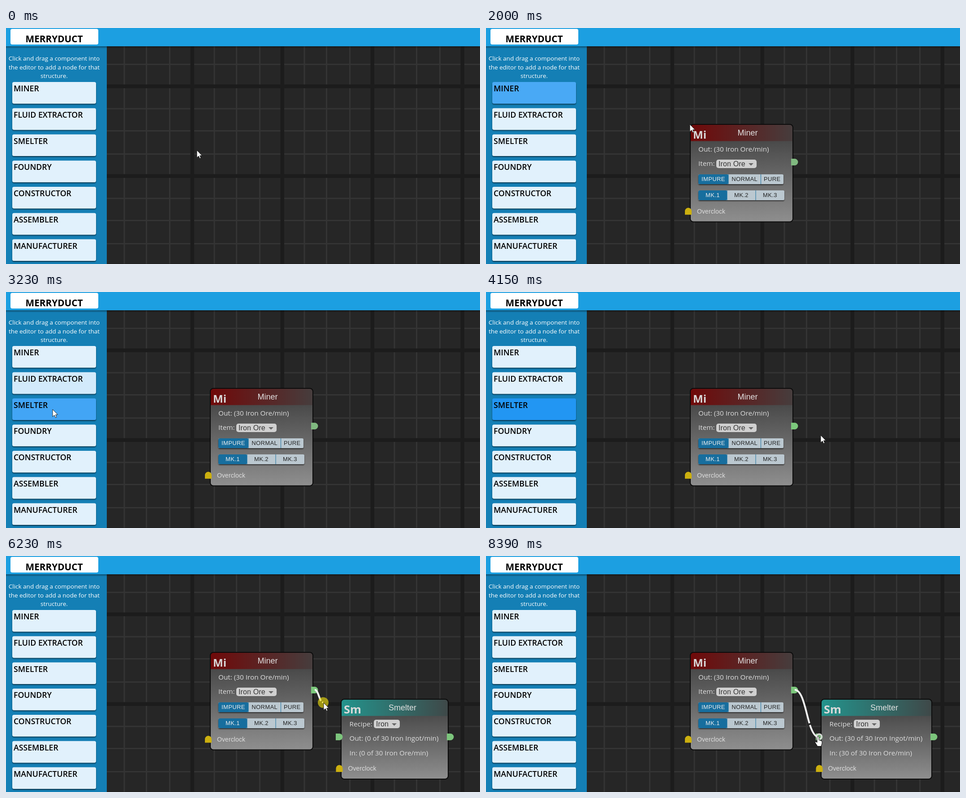
An HTML page that plays this animation: 1058x529 px, repeating every 8.46 s.

```html
<!DOCTYPE html>
<html lang="en">
<head>
<meta charset="utf-8">
<title>Node editor demo</title>
<style>
  html, body { margin: 0; width: 100%; height: 100%; overflow: hidden; background: #262626; }
  svg { display: block; width: 1058px; height: 529px; }
  text { font-family: "Open Sans", "Noto Sans", sans-serif; }
  .hint { font-size: 13.5px; fill: #fff; text-anchor: middle; }
  .card { font-size: 17.7px; font-weight: 600; }
  .heavy { font: 900 33.5px "Noto Sans", sans-serif; font-stretch: extra-condensed; }
  .label { font-size: 15.3px; fill: #dedede; }
  .title, .select, .small, .button { font-family: "Liberation Sans", Arial, sans-serif; }
  .title { font-size: 18px; fill: #e2e2e2; text-anchor: middle; }
  .select { font-size: 16px; letter-spacing: .15px; fill: #333; }
  .small { font-size: 14px; letter-spacing: .1px; fill: #dedede; }
  .button { font-size: 13px; letter-spacing: .37px; text-anchor: middle; }
</style>
</head>
<body>
<svg id="stage" viewBox="0 0 1058 529">
  <defs>
    <linearGradient id="body" x2="0" y2="1">
      <stop offset=".17" stop-color="#4b4b4b"/><stop offset="1" stop-color="#939393"/>
    </linearGradient>
    <linearGradient id="red"><stop stop-color="#700909"/><stop offset="1" stop-color="#463d3d"/></linearGradient>
    <linearGradient id="teal"><stop stop-color="#23948d"/><stop offset="1" stop-color="#3f4848"/></linearGradient>
    <linearGradient id="shade" x2="0" y2="1">
      <stop stop-opacity=".4"/><stop offset="1" stop-opacity="0"/>
    </linearGradient>
    <filter id="drop" x="-10%" y="-20%" width="120%" height="150%">
      <feDropShadow dx="0" dy="2" stdDeviation="1.2" flood-opacity=".6"/>
    </filter>
  </defs>
</svg>
<script>
const stage = document.getElementById('stage');
const FPS = 13, LOOP = 8460;
const cardNames = ['MINER', 'FLUID EXTRACTOR', 'SMELTER', 'FOUNDRY', 'CONSTRUCTOR', 'ASSEMBLER', 'MANUFACTURER'];
const cardY = i => 121 + 58.75 * i;

const rect = (x, y, w, h, fill, more = '') =>
  `<rect x="${x}" y="${y}" width="${w}" height="${h}" fill="${fill}" ${more}/>`;
const text = (cls, x, y, str, more = '') => `<text class="${cls}" x="${x}" y="${y}" ${more}>${str}</text>`;

function grid() {
  let minor = '', major = '';
  for (let k = 0; k < 5; k++) {
    const x = 214.5 + 201 * k, y = -70 + 201 * k;
    for (const d of [49.5, 99, 151]) {
      minor += rect(x + d - 1.5, 41, 3, 488, '#343434') + rect(225, y + d - 1, 833, 3, '#343434');
    }
    major += rect(x - 4, 41, 8.5, 488, '#1c1c1c') + rect(225, y - 4.5, 833, 8.5, '#1c1c1c');
  }
  return rect(225, 41, 833, 488, '#262626') + minor + major;
}

function sidebar() {
  const hints = ['Click and drag a component into', 'the editor to add a node for that', 'structure.'];
  return rect(0, 41, 225, 488, '#147fb5') + rect(0, 41, 1058, 5, 'url(#shade)') +
    rect(0, 0, 1058, 41, '#1c9fe1') + rect(10, 2, 196, 35, '#fff', 'rx="4"') +
    text('heavy', 107.5, 32, 'MERRYDUCT', 'text-anchor="middle" data-max="128"') +
    hints.map((h, i) => text('hint', 107.5, 73 + 19.5 * i, h)).join('') +
    cardNames.map((n, i) => rect(14, cardY(i), 187, 48.5, '#e1f1fc', `rx="4" id="card${i}" filter="url(#drop)"`) +
      text('card', 17, cardY(i) + 21, n)).join('');
}

const socket = (x, y, cls = '') =>
  `<path class="${cls}" d="M${x} ${y}h8a7.5 7.5 0 0 1 0 15h-8z" fill="#7cc57c"/>`;
const clockSocket = (x, y) =>
  `<path d="M${x} ${y + 15}v-8a7.5 7.5 0 0 1 15 0v8z" fill="#ccb00f"/>` + text('small', x + 27, y + 12, 'Overclock');
const select = (x, y, w, str) => rect(x, y, w, 19, '#d0d0d0', 'rx="5"') + text('select', x + 5, y + 15, str) +
  `<path d="M${x + w - 18} ${y + 8}h11l-5.5 5.5z" fill="#666"/>`;

function buttons(x, y, names, widths) {
  const total = widths.reduce((a, b) => a + b);
  let out = rect(x, y, total, 22, '#bbc8d0', 'rx="3" filter="url(#drop)"');
  names.forEach((name, i) => {
    const w = widths[i];
    if (i === 0) out += rect(x, y, w, 22, '#176e9e', 'rx="3"');
    else out += rect(x - .5, y, 1, 22, '#176e9e');
    out += text('button', x + w / 2, y + 15, name, `fill="${i ? '#222' : '#eee'}"`);
    x += w;
  });
  return out;
}

function node(x, y, w, h, grad, icon, iconMax, title, titleX, content) {
  return rect(x, y, w, h, 'url(#body)', 'rx="7" opacity=".96"') +
    `<path d="M${x} ${y + 37.5}v-31q0-6.500 6.500-6.500h${w - 13}q6.500 0 6.500 6.500v31z" fill="url(#${grad})"/>` +
    rect(x, y, w, h, 'none', 'rx="7" stroke="#0b0b0b" stroke-width="2"') +
    text('heavy', x + 6, y + 31.500, icon, `fill="#d9d9d9" data-max="${iconMax}"`) +
    text('title', titleX, y + 25, title) + content;
}

const minerNode = () => node(456, 216, 229, 218.5, 'red', 'Mi', 30, 'Miner', 584,
  text('label', 474, 277, 'Out: (30 Iron Ore/min)') + text('label', 474, 309, 'Item:') +
  select(514, 295, 90, 'Iron Ore') +
  buttons(474, 328, ['IMPURE', 'NORMAL', 'PURE'], [67, 72.5, 50.5]) +
  buttons(474, 364, ['MK.1', 'MK.2', 'MK.3'], [64, 64, 64]) +
  socket(681, 293, 'ore') + clockSocket(444, 403.500));

const smelterNode = (rate, w) => node(748, 321, w, 179, 'teal', 'Sm', 39, 'Smelter', 765.5 + w / 2,
  text('label', 766.5, 382, 'Recipe:') + select(821, 367, 58, 'Iron') +
  text('label', 766.5, 414, `Out: (${rate} of 30 Iron Ingot/min)`) +
  text('label', 766.5, 447, `In: (${rate} of 30 Iron Ore/min)`) +
  socket(736, 398) + socket(736 + w + 9, 398) + clockSocket(736.5, 469));

const group = (id, content) => `<g id="${id}">${content}</g>`;
stage.insertAdjacentHTML('beforeend', grid() + sidebar() +
  group('miner', minerNode()) + group('smelter', smelterNode(0, 239)) + group('fedSmelter', smelterNode(30, 247)) +
  group('ring', '<circle cx="743.5" cy="405" r="7.5" fill="#d6d6d6"/><circle cx="743.5" cy="405" r="4" fill="#72b272"/>') +
  '<path id="link" fill="none" stroke="#f3f3f3" stroke-width="4"/>' +
  group('ghost', rect(0, 0, 188, 49, '#2196f3', 'rx="2"') + text('card', 4, 21, '', 'id="ghostName"')) +
  '<circle id="press" r="12" fill="rgba(240,225,15,.62)"/>' +
  group('arrow', '<path d="M0 0V16.500L4 13 6.500 18.500 9 17.400 6.600 12H11.500Z" fill="#fff" stroke="#111" stroke-width=".9"/>') +
  group('hand', '<path d="M-2 1.500a2 2 0 0 1 4 0v6l5 1.500q2 .5 2 3v3l-2 6.500h-8l-5-8q-1-2 1-2.500l3 2z" fill="#fff" stroke="#111"/>') +
  group('dragMark', rect(2, 16, 11, 7, 'none', 'stroke="#ddd" stroke-width="2" stroke-dasharray="1.500 1.500"')));

// Shrink the heavy lettering evenly when the condensed face is missing.
for (const el of document.querySelectorAll('.heavy')) {
  const width = el.getComputedTextLength();
  if (width > el.dataset.max) el.style.fontSize = 33.5 * el.dataset.max / width + 'px';
}

const $ = id => document.getElementById(id);
const show = (id, on) => $(id).setAttribute('visibility', on ? 'visible' : 'hidden');
const move = (id, x, y) => $(id).setAttribute('transform', `translate(${x} ${y})`);

const eases = {
  linear: u => u,
  in: u => u ** 1.5,
  out: u => 1 - (1 - u) ** 1.5,
  both: u => u * u * (3 - 2 * u)
};

// Keys are [step, values..., ease into this key]; steps run at 13 per second.
function sample(keys, step) {
  const i = keys.findIndex(k => k[0] > step);
  if (i === 0) return keys[0].slice(1);
  if (i < 0) return keys[keys.length - 1].slice(1);
  const a = keys[i - 1], b = keys[i];
  const name = b[b.length - 1];
  const u = (eases[name] || eases.linear)((step - a[0]) / (b[0] - a[0]));
  return a.slice(1).map((v, k) => typeof v === 'number' ? v + (b[k + 1] - v) * u : v);
}

const pointerKeys = [
  [0, 426, 274, ''], [12, 161, 143, 'both'],
  [13, 161, 143, ''], [18, 306, 175, 'in'], [23, 455, 216, 'out'],
  [33, 455, 216, ''], [37, 290, 219, 'in'], [40, 150, 238, 'linear'], [42, 104, 263, 'out'], [44, 100, 266, 'out'],
  [54, 747, 321, 'both'],
  [66, 747, 321, ''], [70, 684, 305, 'both'],
  [77, 684, 305, ''], [81, 709, 329, 'in'], [88, 741, 405, 'out']
];
const cardKeys = [
  [[9, 0], [12, .85], [13, 1], [25, 1], [26, .79], [28, 0]],
  [[37, 0], [39, .5], [42, .08], [43, 0]],
  [[40, 0], [42, .83], [44, .85], [45, 1], [54, 1], [55, .8], [57, 0]]
];
const drags = [
  { from: 13, to: 23, card: 0, dx: 147, dy: 22 },
  { from: 45, to: 54, card: 2, dx: 86, dy: 28 }
];
const idle = [225, 241, 252], active = [33, 150, 243];

function drawLink(step, x, y) {
  const connected = step >= 89;
  const [ex, ey] = connected ? [743, 406] : [x - 1, y - 1];
  const mid = (689 + ex) / 2, link = $('link');
  link.setAttribute('d', `M689 300C${mid} 300 ${mid} ${ey} ${ex} ${ey}`);
  const length = link.getTotalLength();
  const gap = (85 + (step - 109) / FPS * 142 + 125 * 10) % 125;
  link.setAttribute('stroke-dasharray', gap < length ? `${gap} 4 200` : 'none');
  show('link', step >= 75);
}

function render(ms) {
  const step = Math.floor((ms % LOOP + 5) * FPS / 1000);
  const [x, y] = sample(pointerKeys, step);
  const drag = drags.find(d => step >= d.from && step < d.to);
  const hand = step >= 70 && step < 75 || step >= 88;

  cardKeys.forEach((keys, i) => {
    const [level] = sample(keys, step);
    $('card' + i).setAttribute('fill', `rgb(${idle.map((c, k) => Math.round(c + (active[k] - c) * level))})`);
  });

  show('miner', step >= 25);
  show('smelter', step >= 55 && step < 89);
  show('fedSmelter', step >= 89);
  show('ring', step >= 88);
  document.querySelector('.ore').setAttribute('fill', step < 54 ? '#80b980' : '#7cc87c');
  drawLink(step, x, y);

  show('ghost', drag);
  show('dragMark', drag);
  if (drag) {
    move('ghost', x - drag.dx, y - drag.dy);
    $('ghost').setAttribute('opacity', .76);
    $('ghostName').textContent = cardNames[drag.card];
  }
  show('press', drag || step >= 74 && step < 89);
  move('press', x - 1, y - .5);
  show('arrow', !hand);
  show('hand', hand);
  for (const id of ['arrow', 'hand', 'dragMark']) move(id, x, y);
}

const start = performance.now();
function tick() {
  render(performance.now() - start);
  requestAnimationFrame(tick);
}
tick();
</script>
</body>
</html>
```
